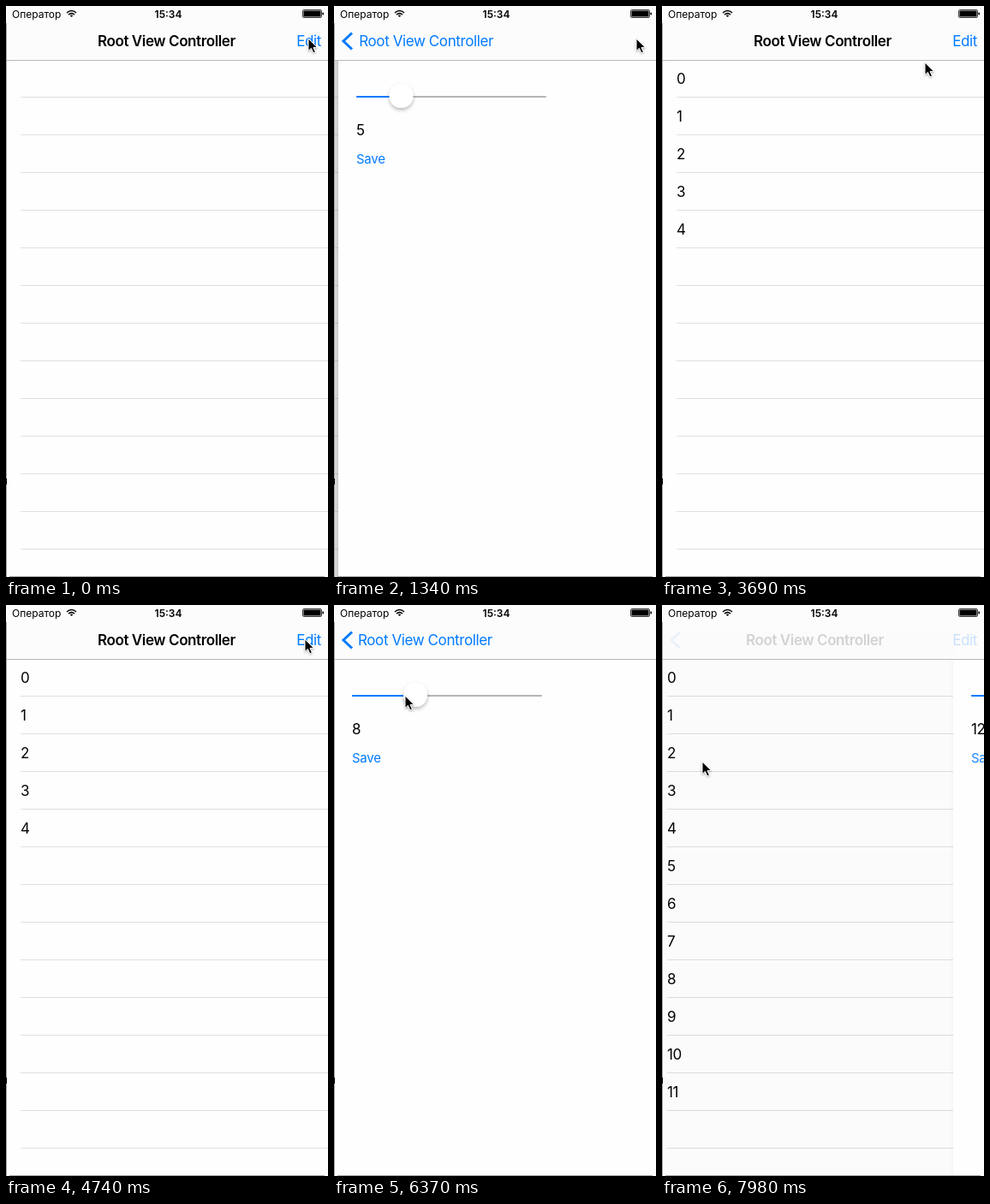
Write an HTML page that moves like this. It is 376 by 667 pixels and loops after 8 s.

```html
<!DOCTYPE html>
<html lang="en">
<head>
<meta charset="utf-8">
<style>
  html, body { margin: 0; width: 100%; height: 100%; overflow: hidden; background: #fefefe; }
  svg { display: block; width: 376px; height: 667px; }
  text { font: 17px Inter, sans-serif; letter-spacing: -.4px; }
  .blue { fill: #007aff; }
  .bold { font-weight: 600; }
  .status text { font-size: 12px; letter-spacing: 0; }
  #save { font-size: 15px; letter-spacing: -.25px; }
</style>
</head>
<body>
<svg viewBox="0 0 376 667">
  <defs>
    <linearGradient id="edge">
      <stop offset="0" stop-opacity="0"/>
      <stop offset="1" stop-opacity=".11"/>
    </linearGradient>
    <filter id="soft" x="-50%" y="-50%" width="200%" height="200%">
      <feDropShadow dx="0" dy="2.5" stdDeviation="2" flood-opacity=".28"/>
    </filter>
    <filter id="lift" x="-50%" y="-50%" width="200%" height="200%">
      <feDropShadow dx="0" dy="1" stdDeviation="1" flood-opacity=".35"/>
    </filter>
  </defs>

  <rect width="376" height="667" fill="#fefefe"/>
  <g id="list"></g>
  <rect id="dim" y="64" width="376" height="603"/>

  <g id="detail">
    <rect id="shade" x="-6" y="64" width="6" height="603" fill="url(#edge)"/>
    <rect y="64" width="376" height="603" fill="#fefefe"/>
    <rect x="21" y="105" width="222" height="2" rx="1" fill="#b5b5b5"/>
    <rect id="fill" x="21" y="105" height="2" rx="1" class="blue"/>
    <circle id="knob" cy="105" r="14" fill="#fff" filter="url(#soft)"/>
    <text id="value" x="21" y="151"></text>
    <text id="save" class="blue" x="21" y="183.5">Save</text>
  </g>

  <rect width="376" height="64" fill="#fcfcfc"/>
  <rect id="tint" y="30" height="33"/>
  <rect y="63" width="376" height="1" fill="#b9b9b9"/>
  <path id="chevron" d="M21 31.5L11 41L21 50.5" fill="none" stroke="#007aff" stroke-width="3"/>
  <text id="title" class="bold" y="47">Root View Controller</text>
  <text id="back" class="blue" y="47">Root View Controller</text>
  <text id="edit" class="blue" x="368" y="47" text-anchor="end">Edit</text>

  <g class="status">
    <text x="7" y="14">Оператор</text>
    <text x="189.5" y="14" text-anchor="middle" class="bold">15:34</text>
    <g fill="none" stroke="#000" stroke-width="1.6">
      <path d="M71 8Q76.5 3 82 8M73 10.2Q76.5 7 80 10.2"/>
      <path d="M74.8 11.2Q76.5 9.8 78.2 11.2L76.5 13Z" fill="#000" stroke="none"/>
    </g>
    <rect x="346.5" y="4.5" width="22" height="9" rx="1.5" fill="none" stroke="#000" stroke-opacity=".75"/>
    <rect x="347.5" y="5.5" width="20" height="7" rx=".5"/>
    <rect x="369.5" y="7.5" width="1.5" height="3" rx=".7"/>
  </g>

  <path d="M.5 20V667M4 666.5H372" stroke="#a6a6a6"/>
  <rect y="552" width="1" height="7"/>
  <path id="cursor" d="M0 0V14.5L3.4 11.4L5.8 16.8L8.4 15.7L6 10.4H10.6Z" stroke="#fff" filter="url(#lift)"/>
</svg>
<script>
const LOOP = 8000, W = 376;
const $ = id => document.getElementById(id);
const set = (id, attrs) => { for (const k in attrs) $(id).setAttribute(k, attrs[k]); };
const clamp = v => Math.max(0, Math.min(1, v));

// Bursts of eight held steps: [first, last]
const bursts = [[900, 1930], [2080, 3100], [3400, 4440], [4590, 5630], [5780, 6810], [6950, 7980]];
// Screen transitions, alternating push and pop
const slides = [996, 2573.7, 5060.5, 7764];
// Pointer path: time, x, y
const path = [
  [0, 353, 38], [1480, 353, 38], [1790, 255, 82], [2230, 60, 170], [2400, 43, 176], [3250, 43, 176],
  [3400, 62, 170], [3550, 190, 115], [3697, 307, 66], [4000, 338, 46], [4440, 349, 40],
  [5190, 349, 40], [5340, 215, 75], [5630, 62, 107], [5780, 63, 107], [6369, 83, 106],
  [6810, 105, 106], [6950, 113, 106], [7100, 112, 110], [7400, 52, 178], [7600, 47, 183], [8000, 47, 183]
];

const rows = [];
for (let i = 0; i < 13; i++) {
  $('list').insertAdjacentHTML('beforeend',
    `<rect x="17" y="${106 + 44 * i}" width="359" height="1" fill="#dfdfe1"/><text x="17" y="${90.5 + 44 * i}">${i}</text>`);
  rows.push($('list').lastElementChild);
}

function hold(t) {
  const b = bursts.filter(b => b[0] <= t).pop();
  if (!b) return 0;
  const step = (b[1] - b[0]) / 7;
  return b[0] + step * Math.min(7, Math.floor((t - b[0] + 10) / step));
}

function pointer(t) {
  const i = Math.max(1, path.findIndex(p => p[0] >= t));
  const [t0, x0, y0] = path[i - 1], [t1, x1, y1] = path[i];
  const f = (t - t0) / (t1 - t0);
  return [x0 + (x1 - x0) * f, y0 + (y1 - y0) * f];
}

// Critically damped spring
function spring(ms) {
  const x = 18.26 * ms / 1000, rest = (1 + x) * Math.exp(-x);
  return rest < .002 ? 1 : 1 - rest;
}

function draw(t) {
  const n = slides.filter(s => s <= t).length;
  const push = n % 2 === 1;
  const since = n ? t - slides[n - 1] : 1e4;
  const p = spring(since);
  const shown = push ? p : 1 - p;
  const left = Math.round(W * (1 - shown));
  const tap = n < 4 && t > slides[n] - 100;

  const count = n < 2 ? 0 : n < 4 ? 5 : 12;
  rows.forEach((r, i) => r.setAttribute('visibility', i < count ? 'visible' : 'hidden'));
  set('list', { transform: `translate(${Math.round((left - W) * .3)})` });
  set('dim', { opacity: .112 * shown });
  set('detail', { transform: `translate(${left})` });
  set('shade', { opacity: clamp(2 * shown) });
  set('tint', { width: Math.min(W, left + 5), opacity: left < W && left > 6 ? .06 * shown : 0 });

  const [x, y] = pointer(t);
  const knob = t < 5780 ? 73.5 : Math.max(73.5, Math.min(125, t > 6940 ? 125 : x + 12));
  set('knob', { cx: knob });
  set('fill', { width: knob - 21 });
  $('value').textContent = Math.round((knob - 35) / 7.7);
  set('save', { opacity: push ? (tap ? .2 : 1) : clamp(.2 + since / 310) });

  const out = clamp(1 - 1.25 * p), into = clamp((p - .89) / .09);
  const moved = p ** 1.2, nav = push ? moved : 1 - moved;
  const titleX = 107 - 79 * nav;
  set('title', { x: titleX, opacity: push ? out : into });
  set('back', { x: titleX, opacity: push ? into : out });
  set('chevron', { opacity: push ? Math.max(into, .12 * p) : Math.max(out, .08 * (1 - into)) });
  const edit = push ? out : Math.max(into, Math.min(.2, .3 * p));
  set('edit', { opacity: tap && !push ? .25 : edit });
  set('cursor', { transform: `translate(${x} ${y})` });
}

const start = performance.now();
function frame() {
  draw(hold((performance.now() - start) % LOOP));
  requestAnimationFrame(frame);
}
frame();
</script>
</body>
</html>
```
